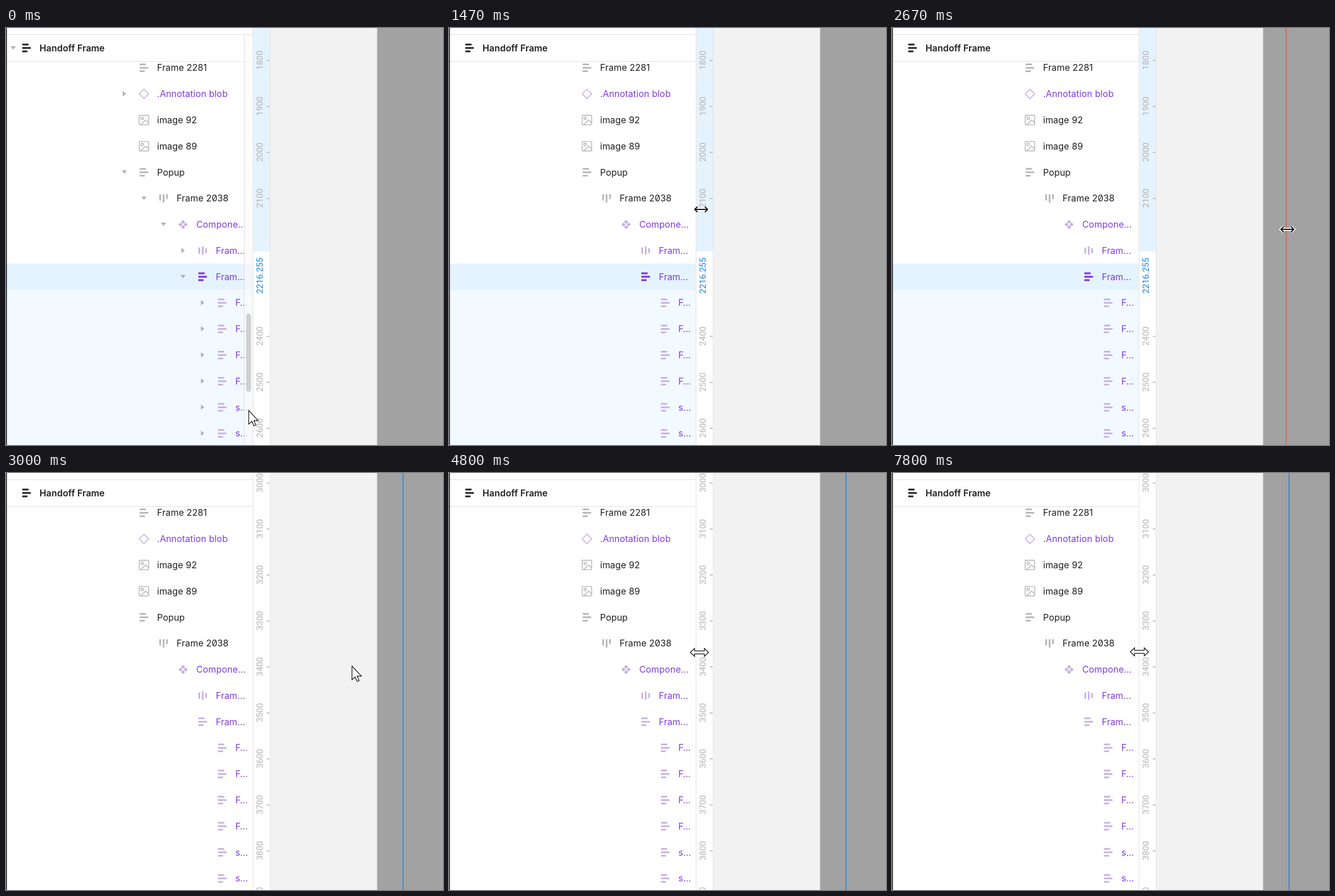
These frames come from a looping animation (766 by 731 pixels, 8 s). An HTML page:

```html
<!DOCTYPE html>
<html lang="en">
<head>
<meta charset="utf-8">
<title>Dragging a guide from the ruler</title>
<style>
  html, body { margin: 0; width: 100%; height: 100%; overflow: hidden; background: #fff; }
  svg { display: block; width: 100%; height: 100%; }
  .layer { font: 400 15.8px Inter, sans-serif; letter-spacing: .08px; font-feature-settings: "zero"; }
  .title { font: 600 15.8px Inter, sans-serif; letter-spacing: .08px; }
  .ruler text { font: 400 15px Roboto, sans-serif; fill: #b3b3b3; text-anchor: middle; }
  .ruler .mark { fill: #1283e4; }
</style>
</head>
<body>
<svg id="stage" viewBox="0 0 766 731"></svg>
<script>
const GREY = '#b3b3b3', INK = '#1f1f1f', PURPLE = '#7f3bdf', LILAC = '#c5afe0', EDGE = '#e5e5e5';
const PITCH = 45.78, INDENT = 34.3, STEP = 1000 / 15, LOOP = 8000;

const rect = (x, y, w, h, fill, more = '') =>
  `<rect x="${x}" y="${y}" width="${w}" height="${h}" fill="${fill}" ${more}/>`;
const path = (d, style) => `<path d="${d}" ${style}/>`;
const group = (id, body, more = '') => `<g id="${id}" ${more}>${body}</g>`;

// Layer icons, drawn around the origin
const bars = (color, size = 2.8) =>
  [11, 15, 9].map((w, i) => rect(-7.5, i * 6 - 6 - size / 2, w, size, color)).join('');
const columns = (color, centred) =>
  [11, 14.5, 8.5].map((h, i) => rect(i * 6 - 7.3, centred ? -h / 2 : -7.3, 2.8, h, color)).join('');
const diamond = (x, y, r, style) => path(`M${x - r} ${y}l${r} ${-r} ${r} ${r} ${-r} ${r}z`, style);
const icons = {
  bars,
  top: c => columns(c, false),
  mid: c => columns(c, true),
  blob: c => diamond(0, 0, 8.3, `fill="none" stroke="${c}" stroke-width="1.5"`),
  parts: c => [[0, -4.5], [4.5, 0], [0, 4.5], [-4.5, 0]]
    .map(([x, y]) => diamond(x, y, 3.5, `fill="${c}"`)).join(''),
  image: c => `<g fill="none" stroke="${c}" stroke-width="1.4">
    <rect x="-8.3" y="-8.3" width="16.6" height="16.6" rx="1"/>
    <circle cx="-3" cy="-3" r="2.2"/><path d="M-5.5 8L3 -.2 8 4.8"/></g>`
};
const arrow = (x, y, open) =>
  path(open ? `M${x - 4.7} ${y - 3}h9.4l-4.7 6z` : `M${x - 3} ${y - 4.7}v9.4l6 -4.7z`, `fill="${GREY}"`);

// name, indent, icon, purple, arrow: 0 none, 1 closed, 2 open
const layers = [
  ['Frame 2281', 0, 'bars', 0, 0],
  ['.Annotation blob', 0, 'blob', 1, 1],
  ['image 92', 0, 'image', 0, 0],
  ['image 89', 0, 'image', 0, 0],
  ['Popup', 0, 'bars', 0, 2],
  ['Frame 2038', 1, 'top', 0, 2],
  ['Compone…', 2, 'parts', 1, 2],
  ['Fram…', 3, 'mid', 1, 1],
  ['Fram…', 3, 'bars', 1, 2],
  ...[...'FFFFss'].map(c => [c + '…', 4, 'bars', 1, 1])
];
let rows = '', arrows = arrow(12.7, 35, true);
layers.forEach(([name, indent, icon, purple, fold], i) => {
  const y = 69.8 + i * PITCH, dx = indent * INDENT;
  rows += `<g transform="translate(${241.8 + dx} ${y})">${icons[icon](purple ? LILAC : GREY)}
    <text class="layer" x="23" y="5.6" fill="${purple ? PURPLE : INK}">${name}</text></g>`;
  if (fold) arrows += arrow(207.5 + dx, y - .3, fold === 2);
});

// Ruler labels every 100 units
function scale(first, y0, count, skip = []) {
  let out = '';
  for (let i = 0; i < count; i++) {
    if (skip.includes(i)) continue;
    const y = y0 + i * 80.6;
    out += rect(457, y - .8, 5.5, 1.5, GREY) +
      `<text transform="translate(450.3 ${y - .5}) rotate(-90)">${first + i * 100}</text>`;
  }
  return out;
}

const resize = 'M-16 0L-8.5 -7V-2.6H8.5V-7L16 0L8.5 7V2.6H-8.5V7Z';
const slide = 'M-11 0H11M-6.5 -4.8L-11.3 0L-6.5 4.8M6.5 -4.8L11.3 0L6.5 4.8';
const pointer = 'M.5 .5V24.5L6 19.5L9.5 27.5L13 26L9.6 18.2H17Z';
const outline = 'fill="#fff" stroke="#111" stroke-width="1.2"';

document.getElementById('stage').innerHTML =
  rect(0, 0, 766, 731, '#f2f2f2') + rect(650.5, 0, 116, 731, '#a2a2a2') +
  rect(0, 0, 433, 731, '#fff') +
  group('picked', rect(0, 413, 433, 46, '#e5f3ff') + rect(0, 459, 433, 272, '#f2f9ff')) +
  rows +
  group('pickedIcon', bars(PURPLE, 3.2), `transform="translate(${241.8 + 3 * INDENT} ${69.8 + 8 * PITCH})"`) +
  rect(0, 0, 433, 58, '#fff') + rect(0, 11, 433, 1.3, EDGE) + rect(0, 58, 433, 1.3, EDGE) +
  `<g transform="translate(36 35)">${bars(INK, 3)}</g>
   <text class="title" x="58.7" y="40.7" fill="${INK}">Handoff Frame</text>` +
  group('hover', arrows + rect(418, 12, 15, 719, '#fafafa', 'opacity=".65"') +
    rect(417, 12, 1.2, 719, '#e2e4e6') +
    rect(421, 500.5, 8.5, 137.5, '#000', 'rx="4.2" opacity=".17"')) +
  rect(0, 0, 1.5, 731, '#1e1e1e') +
  rect(433, 0, 30, 731, '#fff') +
  group('local', rect(433, 0, 30, 391.5, '#e5f3ff') + scale(1800, 57, 9, [5]).replace(/<rect[^>]*><text[^>]*>2300<\/text>/, '').replace(/<rect[^>]*\/><text[^>]*>2200<\/text>/, '') +
    '<text class="mark" transform="translate(450.3 434) rotate(-90)">2216.255</text>', 'class="ruler"') +
  group('page', scale(3000, 17.7, 10), 'class="ruler"') +
  rect(432.5, 0, 1.2, 731, EDGE) + rect(462.5, 0, 1.2, 731, EDGE) +
  rect(0, 0, 1.5, 731, '#d65f4b', 'id="guide"') +
  group('cursor',
    group('a', path(pointer, outline)) + group('r', path(resize, outline)) +
    group('g', path(slide, 'fill="none" stroke="#fff" stroke-width="5"') +
      path(slide, 'fill="none" stroke="#111" stroke-width="2"')));

// Cursor stops: step, x, y, kind (a pointer, r panel resize, g guide drag)
const stops = [
  [1, 425, 670, 'a'], [12, 422, 315, 'a'], [14, 423, 319, 'a'], [15, 431, 326, 'r'], [17, 434, 329, 'r'],
  [19, 434, 329, 'r'], [20, 447, 312, 'g'], [22, 442, 318, 'g'], [29, 442, 318, 'g'],
  [32, 476, 325, 'g'], [33, 486, 326, 'g'], [35, 550, 333, 'g'], [37, 645, 347, 'g'], [39, 692, 353, 'g'],
  [40, 693, 353, 'g'], [42, 697, 352, 'g'], [43, 690, 350, 'a'], [49, 438, 314, 'r'], [50, 434, 312, 'r'],
  [51, 434, 312, 'r'], [52, 425, 307, 'a'], [53, 423, 305, 'a'], [54, 423, 305, 'a'], [56, 432, 310, 'r'],
  [59, 443, 311, 'g'], [61, 449, 310, 'g'], [64, 449, 310, 'g'], [66, 450, 310, 'g'], [69, 450, 310, 'g'],
  [71, 432, 312, 'r'], [73, 446, 317, 'g'], [74, 452, 319, 'g'], [76, 452, 319, 'g'], [80, 437, 317, 'g'],
  [81, 437, 317, 'g'], [82, 438, 316, 'r'], [95, 438, 316, 'r'], [96, 434.5, 314, 'r'], [98, 424, 310, 'a'],
  [101, 422, 308, 'a'], [108, 422, 308, 'a'], [109, 434, 314, 'r'], [110, 437, 315, 'r'], [115, 437, 315, 'r'],
  [117, 433.7, 313.5, 'r']
];

function cursorAt(step) {
  const next = stops.findIndex(s => s[0] > step);
  if (next === 0) return stops[0];
  if (next < 0) return stops[stops.length - 1];
  const [k, x, y, kind] = stops[next - 1], [k2, x2, y2] = stops[next];
  const p = (step - k) / (k2 - k);
  return [step, x + (x2 - x) * p, y + (y2 - y) * p, kind];
}

const el = id => document.getElementById(id);
const show = (id, on) => el(id).setAttribute('visibility', on ? 'visible' : 'hidden');

function draw(now) {
  const step = Math.floor((now % LOOP + 4) / STEP);
  const [, x, y, kind] = cursorAt(step);
  const dropped = step >= 43;
  show('picked', !dropped);
  show('pickedIcon', !dropped);
  show('local', !dropped);
  show('page', dropped);
  show('hover', kind === 'a' && x < 433);
  show('guide', step > 30);
  // The guide trails the cursor by one step
  const guide = cursorAt(Math.min(step - 1, 42))[1] - 1.7;
  el('guide').setAttribute('x', guide);
  el('guide').setAttribute('fill', dropped ? '#1a87dd' : '#d65f4b');
  for (const id of ['a', 'r', 'g']) show(id, id === kind);
  el('cursor').setAttribute('transform', `translate(${x} ${y})`);
}

const start = performance.now();
function tick(now) {
  draw(Math.max(0, now - start));
  requestAnimationFrame(tick);
}
draw(0);
tick(start);
</script>
</body>
</html>
```
